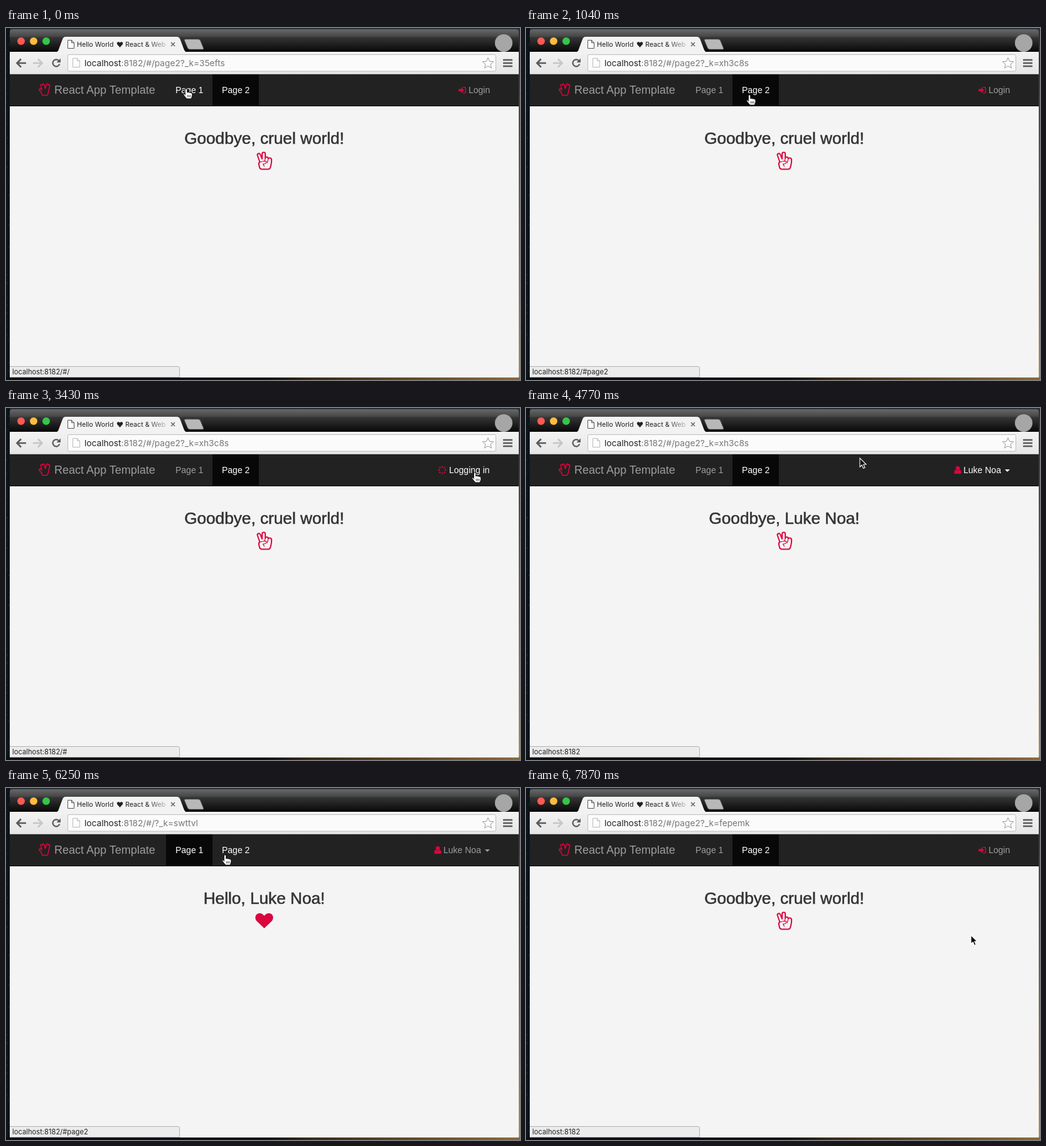
Animation of 819x562 px, one loop 8 s. Source, as an HTML page:

```html
<!DOCTYPE html>
<html lang="en">
<head>
<meta charset="utf-8">
<title>App walkthrough</title>
<style>
html, body { margin: 0; width: 819px; height: 562px; overflow: hidden; }
svg { display: block; font: 14px "Liberation Sans", Arial, sans-serif; }
.ui { font-family: Inter, Roboto, sans-serif; }
.red { fill: #d9063d; }
.line { fill: none; stroke: #d9063d; stroke-linejoin: round; stroke-linecap: round; }
.nav { fill: #9d9d9d; }
.nav.on { fill: #fff; }
.head { font-size: 26.2px; fill: #333; stroke: #333; stroke-width: .55px; text-anchor: middle; }
</style>
</head>
<body>
<svg width="819" height="562" viewBox="0 0 819 562">
  <defs>
    <linearGradient id="bar" x2="0" y2="1">
      <stop stop-color="#686868"/><stop offset=".3" stop-color="#484848"/>
      <stop offset=".36" stop-color="#343434"/><stop offset="1" stop-color="#050505"/>
    </linearGradient>
    <linearGradient id="tools" x2="0" y2="1"><stop stop-color="#f2f2f2"/><stop offset="1" stop-color="#e6e6e6"/></linearGradient>
    <linearGradient id="edge" x2="0" y2="1">
      <stop stop-color="#26303a"/><stop offset=".4" stop-color="#5c5750"/><stop offset="1" stop-color="#b18b52"/>
    </linearGradient>
    <linearGradient id="floor">
      <stop stop-color="#071117"/><stop offset=".5" stop-color="#0d1114"/>
      <stop offset=".6" stop-color="#3a2c18"/><stop offset="1" stop-color="#8a6a3c"/>
    </linearGradient>
    <linearGradient id="fade" gradientUnits="userSpaceOnUse" x1="225" x2="259">
      <stop stop-color="#222"/><stop offset="1" stop-color="#222" stop-opacity=".12"/>
    </linearGradient>
    <filter id="shadow" x="-10%" y="-10%" width="120%" height="125%">
      <feDropShadow dx="0" dy="5" stdDeviation="4" flood-opacity=".2"/>
    </filter>
  </defs>

  <!-- desktop -->
  <rect width="819" height="562" fill="#0a141a"/>
  <rect x="6" width="813" height="2" fill="#2a3036"/>
  <g id="stars" fill="#7d8d98"></g>
  <rect x="816" width="3" height="562" fill="url(#edge)"/>
  <rect y="557" width="819" height="5" fill="url(#floor)"/>

  <!-- window -->
  <path d="M6 39V6q0-4 4-4H813q4 0 4 4V39z" fill="url(#bar)"/>
  <circle cx="24" cy="21" r="6" fill="#fc5a54"/>
  <circle cx="44" cy="21" r="6" fill="#fdbc40"/>
  <circle cx="64" cy="21" r="6" fill="#34c648"/>
  <circle cx="793" cy="24" r="14" fill="#a6a6a6"/>
  <path d="M79 39q4-1 5-5l6-16q1.5-4 5-4H272q4 0 5.500 4l6 16q1.500 4 5 5z" fill="#f2f2f2"/>
  <path d="M286 18H306q2.500 0 3.500 2l5 12q.7 2-1.500 2H293q-2.500 0-3.500-2l-5-12q-.7-2 1.500-2z" fill="#b8b8b8" stroke="#666" stroke-width=".7"/>
  <path d="M98.500 19.500h6l4 4v9h-10zM104.500 19.500v4h4" fill="#fff" stroke="#555"/>
  <g class="ui" font-size="10.7" fill="#222">
    <text x="113" y="30">Hello World</text>
    <path d="M181.500 31l-4-4.500c-2.500-3.500 2-6 4-3 2-3 6.500-.5 4 3z"/>
    <text x="190" y="30" fill="url(#fade)">React &amp; Web</text>
  </g>
  <path d="M263 23l6 6m0-6l-6 6" stroke="#666" stroke-width="1.500"/>
  <rect x="6" y="38" width="811" height="36" fill="url(#tools)"/>
  <path d="M6 73.500H817" stroke="#bcbcbc"/>
  <g fill="none" stroke="#5a5a5a" stroke-width="2.600">
    <path d="M32 56H18M24 49.500L17.500 56l6.500 6.500"/>
    <path d="M43 56H57M51 49.500L57.500 56l-6.500 6.500" stroke="#c6c6c6"/>
    <path d="M84 52a5.500 5.500 0 1 0 1.300 5.500" stroke-width="2.200"/>
    <path d="M792 51H807M792 56H807M792 61H807"/>
  </g>
  <path d="M87 48.500v6.500h-6.500z" fill="#5a5a5a"/>
  <rect x="98.500" y="42.500" width="682" height="26.500" rx="2" fill="#fbfbfb" stroke="#bdbdbd"/>
  <path d="M106.500 48.500h7l4 4v10h-11zM113.500 48.500v4h4" fill="#fff" stroke="#bbb"/>
  <path d="M768 47.500l2.500 5.800 6.200.5-4.700 4.100 1.500 6.100-5.500-3.300-5.500 3.300 1.500-6.100-4.700-4.100 6.200-.5z" fill="#fff" stroke="#999"/>
  <text class="ui" x="125" y="61" font-size="13.700" fill="#777"><tspan fill="#222">localhost</tspan><tspan id="url"></tspan></text>

  <!-- page -->
  <rect x="6" y="125" width="811" height="433" fill="#f4f4f4"/>
  <rect x="6" y="74" width="811" height="51" fill="#222"/>
  <rect x="6" y="124" width="811" height="1" fill="#080808"/>
  <path class="line" stroke-width="1.600" d="M57 104l-3.800-4.500c-1.200-1.800.8-3.200 2.400-2l1.600 1.400-2-7c-.3-2 2.200-2.400 2.800-.6-.2-2.200 2.600-2.600 3-.6l1.600 6 1.800-6.200c.6-2 3.200-1.400 2.900.8.800-1.200 2.900-.6 2.500 1.200l-1.600 6.600q0 3-1.200 5-.6 3.400-2.400 3.400h-5.400q-2 0-2.200-2.700z"/>
  <text x="77" y="105" font-size="18" class="nav">React App Template</text>
  <rect id="active" y="74" width="74" height="50" fill="#080808"/>
  <text id="p1" class="nav" x="270" y="104">Page 1</text>
  <text id="p2" class="nav" x="344" y="104">Page 2</text>

  <g id="out">
    <path class="red" d="M721 97.500h4v-3l5 4.700-5 4.700v-3h-4z"/>
    <path class="line" stroke-width="1.400" d="M728.500 94.700h2q1.800 0 1.800 1.800v5.400q0 1.800-1.800 1.800h-2"/>
    <text id="login" class="nav" x="737" y="104">Login</text>
  </g>
  <g id="busy">
    <g id="spin" class="red"></g>
    <text class="nav on" x="706" y="104">Logging in</text>
  </g>
  <g id="in">
    <rect id="open" x="668" y="74" width="119" height="50" fill="#080808"/>
    <circle class="red" cx="688" cy="96.300" r="3.300"/>
    <path class="red" d="M685 98.500q3 2.500 6 0 2.700.7 2.700 4.700 0 1.800-1.700 1.800h-8q-1.700 0-1.700-1.800 0-4 2.700-4.700z"/>
    <g id="user" class="nav"><text x="697" y="104">Luke Noa</text><path d="M763 98h8l-4 4z"/></g>
  </g>

  <text id="title" class="head" x="411.500" y="185"></text>
  <path id="heart" class="red" d="M411.500 224l-12-11.500c-4.500-5.500-1.500-12.500 4.500-12.500 4 0 6 2.500 7.500 4 1.500-1.500 3.500-4 7.500-4 6 0 9 7 4.500 12.500z"/>
  <g id="peace" class="line">
    <path stroke-width="2" d="M404.500 214l-3.800-10.500c-1-3 3.200-4.500 4.400-1.600l3 7V201c0-3.200 5-3.200 5 0v6.500c1.200-2.300 4.500-2 4.800.8 1.500-1.600 5.300-1 5.300 2.200 0 6.500-.8 8-2 12-.5 2-1.500 3-3.500 3h-10q-3 0-3.700-3l-1.200-5q-.3-2.500 1.700-3.500z"/>
    <path stroke-width="1.200" d="M413.100 207.500l-1.200 5.500M417.900 208.500l-1.500 6.500M404.500 214l6.500-1.500q4.500-.5 4 2.500-1 2-5.500 2.200l2 3.500"/>
  </g>

  <g id="menu">
    <rect x="617.500" y="121" width="169" height="137.500" rx="3.500" fill="#fff" stroke="#c8c8c8" filter="url(#shadow)"/>
    <rect x="618" y="74" width="50" height="51" fill="#222"/>
    <rect x="668" y="118" width="119" height="7" fill="#080808"/>
    <rect x="617" y="124" width="170" height="1" fill="#080808"/>
    <rect id="row" x="618" width="168" height="26" fill="#f5f5f5"/>
    <path d="M618 217.500H786" stroke="#e5e5e5"/>
    <g fill="#333">
      <text x="637.500" y="148">Action</text>
      <text x="637.500" y="174">Another action</text>
      <text x="637.500" y="200">Something else here</text>
      <text x="654.500" y="245">Logout</text>
    </g>
    <path class="red" d="M641 238.500h4v-3l5 4.700-5 4.700v-3h-4z"/>
    <path class="line" stroke-width="1.400" d="M642 235.700h-2q-1.800 0-1.800 1.800v5.400q0 1.800 1.800 1.800h2"/>
  </g>

  <g id="status">
    <path d="M6 540.500H274q2.500 0 2.500 2.500V557.500H6" fill="#ececec" stroke="#b2b2b2"/>
    <text class="ui" id="link" x="10" y="553" font-size="11.200" fill="#222"></text>
  </g>

  <g id="hand">
    <path d="M-1.700 9V1.500C-1.700-.8 1.800-.8 1.800 1.500V5.500q2.200-1 3 .4 2-.7 2.700.7 2.400-.3 2.400 2V11.500L8.300 16H.8L-3.800 10.500C-5.500 7.800-3 6.800-1.700 9z" fill="#fff" stroke="#111" stroke-width="1.100"/>
    <path d="M2.300 10v3.500M4.600 10v3.500M6.900 10v3.500" stroke="#222" stroke-width=".9"/>
  </g>
  <path id="arrow" d="M0 0V14l3.200-3 2.300 5.300 2.500-1.100L5.700 10h4.300z" fill="#000" stroke="#fff" stroke-width="1.100"/>
</svg>
<script>
const LOOP = 8000, ROWS = { r1: 130, r2: 156, r3: 182, r4: 227 };
const $ = id => document.getElementById(id);
const show = (id, on) => $(id).style.display = on ? '' : 'none';
const light = (id, on) => $(id).classList.toggle('on', on);

// Each step: time, pointer x and y, then whatever changes.
const steps = [
  [0, 287, 97, { hand: true, hover: 'p1', page: 2, key: '35efts', link: '/#/', auth: 'out', menu: false, focus: false }],
  [450, 287, 97, { page: 1, key: 'q7wd2n' }],
  [600, 304, 100, {}],
  [750, 335, 104, { hover: 'p2', link: '/#page2' }],
  [890, 356, 107, {}],
  [1040, 356, 107, { page: 2, key: 'xh3c8s' }],
  [1790, 652, 110, { hand: false, hover: '' }],
  [2090, 706, 110, { link: null }],
  [2240, 732, 106, { hand: true, hover: 'login', link: '/#' }],
  [2390, 740, 105, {}],
  [2530, 744, 104, {}],
  [2680, 746, 103, {}],
  [2830, 747, 103, {}],
  [3430, 747, 103, { auth: 'busy' }],
  [4470, 747, 103, { auth: 'in', focus: true }],
  [4770, 532, 80, { hand: false, hover: '', link: '' }],
  [4920, 455, 90, {}],
  [5070, 375, 98, { hand: true, hover: 'p2', link: '/#page2' }],
  [5210, 312, 102, { hover: 'p1', link: '/#/' }],
  [5360, 293, 103, {}],
  [5500, 290, 103, { page: 1, key: 'swttvl', focus: false }],
  [5650, 289, 104, {}],
  [6100, 320, 106, {}],
  [6250, 349, 107, { hover: 'p2', link: '/#page2' }],
  [6400, 349, 107, { page: 2, key: 'fepemk' }],
  [6550, 724, 110, { hover: 'user', link: '' }],
  [6850, 722, 113, { menu: true }],
  [6990, 722, 114, {}],
  [7140, 716, 160, { hover: 'r2' }],
  [7280, 710, 200, { hover: 'r3' }],
  [7430, 708, 234, { hover: 'r4' }],
  [7730, 709, 235, { hand: false, hover: '', auth: 'out', menu: false }],
];

function stateAt(t) {
  const s = {};
  for (const [at, x, y, change] of steps) if (at <= t) Object.assign(s, change, { x, y });
  return s;
}

function draw(now) {
  const t = now % LOOP, s = stateAt(t), first = s.page === 1;
  $('url').textContent = `:8182/#/${first ? '' : 'page2'}?_k=${s.key}`;
  $('active').setAttribute('x', first ? 255 : 329);
  light('p1', first || s.hover === 'p1');
  light('p2', !first || s.hover === 'p2');
  light('login', s.hover === 'login');
  light('user', s.hover === 'user' || s.focus || s.menu);

  for (const id of ['out', 'busy', 'in']) show(id, s.auth === id);
  const turn = Math.floor((t - 3430) / 148.500) * 27;
  $('spin').setAttribute('transform', `translate(695 99) rotate(${turn})`);

  const who = s.auth === 'in' ? 'Luke Noa' : first ? 'world' : 'cruel world';
  $('title').textContent = `${first ? 'Hello' : 'Goodbye'}, ${who}!`;
  show('heart', first);
  show('peace', !first);

  show('menu', s.menu);
  show('open', s.menu);
  show('row', s.hover in ROWS);
  $('row').setAttribute('y', ROWS[s.hover] || 0);

  show('status', s.link !== null);
  $('link').textContent = 'localhost:8182' + (s.link || '');
  for (const id of ['hand', 'arrow']) {
    show(id, s.hand === (id === 'hand'));
    $(id).setAttribute('transform', `translate(${s.x} ${s.y})`);
  }
  requestAnimationFrame(draw);
}

const dot = (x, y, r, alpha) => `<circle cx="${x}" cy="${y}" r="${r}" opacity="${alpha}"/>`;
$('spin').innerHTML = Array.from({ length: 8 }, (_, i) =>
  dot(5.200 * Math.cos(i * Math.PI / 4), 5.200 * Math.sin(i * Math.PI / 4), 1.200, 1)).join('');
$('stars').innerHTML = Array.from({ length: 45 }, (_, i) =>
  dot(i * 37 % 53 / 10, i * 197 % 556, .5, .3 + i % 4 * .15)).join('');

requestAnimationFrame(draw);
</script>
</body>
</html>
```
